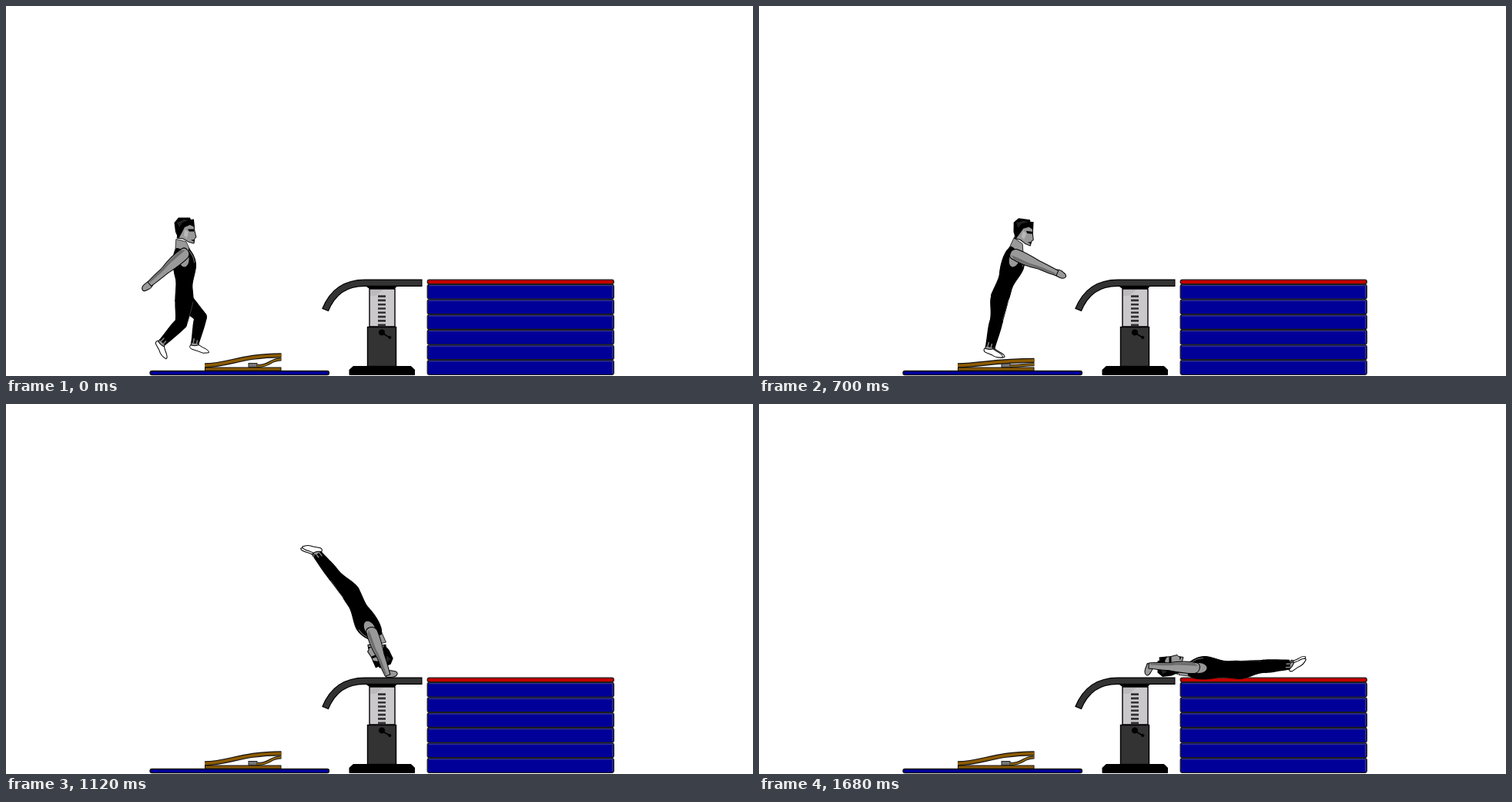
Recreate the animation shown at these times as an HTML page. Size 970 px wide and 480 px high, loop 2.1 s.

```html
<!DOCTYPE html>
<html lang="en">
<head>
<meta charset="utf-8">
<title>Vault to handstand</title>
<style>
html, body { margin: 0; width: 100%; height: 100%; overflow: hidden; background: #fff; }
svg { display: block; width: 100vw; height: 100vh; }
.line { fill: none; }
.skin { fill: #999; stroke: #000; stroke-linejoin: round; }
.foot { fill: #fff; stroke: #000; stroke-linejoin: round; }
</style>
</head>
<body>
<svg viewBox="0 0 970 480">
  <defs>
    <g id="thigh"><path d="M-12,-2C-13,9 -8,17 -8,30A8 8 0 0 0 8,30C9,20 11,8 11,-2A11.5 10 0 0 0 -12,-2Z"/></g>
    <g id="shin">
      <path d="M-8,0C-9,10 -6.5,20 -5.5,35H5C6,24 8,12 8,0A8 8 0 0 0 -8,0Z"/>
      <path d="M-2.5,29V35M2,30V35" stroke="#888" stroke-width="1.5"/>
    </g>
    <g id="foot">
      <path class="skin" d="M-5,-2H4L6,3H-5Z"/>
      <path class="foot" d="M-6,1Q0,3 5,1L10,4Q19,8 18,11Q10,13 4,9L-5,6Q-8,4 -6,1Z"/>
    </g>
  </defs>

  <rect x="187" y="473.5" width="232.5" height="5.2" rx="2.6" fill="#000099" stroke="#111" stroke-width="1.3"/>

  <g>
    <rect x="258.5" y="469" width="98.5" height="4" fill="#8c5a00" stroke="#111"/>
    <rect x="315" y="463.5" width="11" height="5" fill="#777" stroke="#222"/>
    <path class="line strut" stroke="#111" stroke-width="4"/>
    <path class="line strut" stroke="#94690a" stroke-width="2"/>
    <path class="line plank" stroke="#111" stroke-width="6.2"/>
    <path class="line plank" stroke="#8c5a00" stroke-width="3.8"/>
  </g>

  <g stroke="#000">
    <path d="M467,363H508L504,367H473Z"/>
    <rect x="472" y="367" width="33" height="49" fill="#cac8ca" stroke-width="1.4"/>
    <path d="M480,376L490,368H473V376Z" fill="#bcbabc" stroke="none"/>
    <path d="M488,375.3V415" stroke="#333" stroke-width="10" stroke-dasharray="2.6 2.7"/>
    <rect x="469.5" y="416.5" width="37" height="51" fill="#333" stroke-width="1.4"/>
    <circle cx="488" cy="423.5" r="3.6"/>
    <path d="M488,424L498,430" stroke-width="1.6"/>
    <circle cx="498.3" cy="430" r="1.6"/>
    <path d="M451,467.5H526L530.5,472V478.5H446V472Z"/>
    <path class="line" d="M414.5,394.5C424,371 440,359.2 466,359.2H540.5" stroke-width="9.4"/>
    <path class="line" d="M415,393.5C424,371 440,359.2 466,359.2H539.5" stroke="#333" stroke-width="7"/>
  </g>

  <g id="mats" stroke-width="1.3"></g>

  <g>
    <use href="#foot" id="farFoot"/>
    <use href="#shin" id="farShin"/>
    <use href="#thigh" id="farThigh"/>
    <g id="neck"><path class="skin" stroke-width=".7" d="M-7,-80L6,-76L10,-66L4,-57L-9,-64Z"/></g>
    <g id="head">
      <path class="skin" d="M-7,-4L-3,-18L8,-24L15,-21L16,-13L18,-5L16,-3.5L15,3L8,1L1,-3Z"/>
      <path d="M3,-15L8,-12L6,-4L2,-7Z" fill="#b8b8b8"/>
      <path d="M-10.5,-24L-5,-30.5L10,-30.5L11,-28L15,-28.5L16,-18L10,-21L3,-18L0,-12L-5,-3L-9,-12Z"/>
      <path d="M-7,-24L2,-28L8,-27L0,-24L-4,-18Z" fill="#222"/>
      <path d="M7,-15.5H15L15.5,-12.5H9ZM11,-1.5L15.5,-2L15,0.5Z"/>
    </g>
    <g id="torso">
      <path d="M-7,-68C-13,-62 -14,-46 -10,-28C-9,-20 -12,-10 -12,0Q-10,11 0,11Q11,11 11,0C12,-8 10,-14 11,-20C12,-28 17,-38 17,-46C17,-55 13,-61 9,-67C10,-62 7,-59 3,-62Q0,-67 -7,-68Z" stroke="#000"/>
      <path class="line" d="M9,-64Q15,-57 15,-48" stroke="#777"/>
    </g>
    <use href="#foot" id="nearFoot"/>
    <use href="#shin" id="nearShin"/>
    <g id="nearThigh">
      <use href="#thigh"/>
      <path class="line" d="M11,0C11,10 9,20 8,28" stroke="#3a3a3a"/>
    </g>
    <g id="armhole"><ellipse class="skin" cx="2" cy="-54" rx="7" ry="11"/></g>
    <g id="hand"><path class="skin" d="M-3.5,-2H3.5Q6,3 4,8Q3,13 0,13Q-4,12 -4,6Z"/></g>
    <g id="arm">
      <path class="skin" d="M-7,-3C-6,-9 5,-9 7,-1C8,12 6,24 5,32C5,42 4,50 3.5,59H-3.5C-5,48 -5,42 -5,34C-7,24 -9,10 -7,-3Z"/>
      <path fill="#6c6c6c" d="M-6.5,0C-7,12 -5,24 -4.5,34L-3,57H-1C-1,44 -1,36 -2,28C-4,18 -2,8 -3,-5Z"/>
    </g>
  </g>
</svg>
<script>
const $ = id => document.getElementById(id);
const THIGH = 30, SHIN = 36, ARM = 58;
const HOLD = 420, STEP = 70, LOOP = 2100, LAST = 19;
const TAKEOFF = 8, UPRIGHT = 15;
const SHOULDER = [2, -60], NECK = [1, -77];

// Landing mats: a thin red cover on six blue blocks
const block = (y, h, fill) =>
  `<rect x="547.2" y="${y}" width="242" height="${h}" rx="2.5" fill="${fill}" stroke="#1c1c1c"/>`;
let mats = block(355.2, 5.4, '#c40000');
for (let i = 0; i < 6; i++) {
  const y = 361.3 + i * 19.65;
  mats += block(y, 18.8, '#000099') +
    `<path class="line" d="M549,${y + 1.4}H787.5V${y + 17}" stroke="#34348c"/>`;
}
$('mats').innerHTML = mats;

const mix = (a, b, u) => a + (b - a) * u;

// Turns the local point (x, y) around p.
function turn(p, deg, [x, y]) {
  const r = deg * Math.PI / 180, c = Math.cos(r), s = Math.sin(r);
  return [p[0] + x * c - y * s, p[1] + x * s + y * c];
}

// Legs side by side: thigh, shin and foot of the near leg, then of the far one.
const together = (leg, foot = leg + 30) =>
  [leg - 4, leg, foot, leg - 6, leg - 2, foot - 2];

// Run-up: [step, hip x, hip y, lean, head, arm, legs...], angles in degrees.
const run = [
  [0, 232, 382, -3, 0, 49, 9, 44, 43, -44, 12, 0],
  [1, 243, 374, 0, 0, 44, 6, 24, 10, -40, 3, 0],
  [3, 279, 372, 2, 0, -9, -3, 1, 3, -8, -6, 0],
  [5, 313, 379, 18, 8, -66, ...together(14, 4)],
  [7, 343, 350, 44, 31, -101, ...together(29)],
  [8, 372, 345, 68, 42, -80, ...together(62)]
];

function runUp(k) {
  const i = Math.max(1, run.findIndex(p => p[0] >= k));
  const a = run[i - 1], b = run[i], u = (k - a[0]) / (b[0] - a[0]);
  const [, x, y, lean, head, arm, ...legs] = a.map((n, j) => mix(n, b[j], u));
  return { hip: [x, y], lean, head, arm, hand: 0, legs };
}

// The hands stay planted while the body slows into the vertical.
function swing(k) {
  const left = (UPRIGHT - k) / (UPRIGHT - TAKEOFF - 1);
  const lean = 180 - 85 * left ** 2.5;
  const arm = 4 - 54 * left ** 2;
  const shoulder = turn([498 - 4 * left, 351], arm, [0, -ARM]);
  const hip = turn(shoulder, lean, SHOULDER.map(n => -n));
  return { hip, lean, head: 180 - 95 * left ** 4, arm, hand: -76, legs: together(181 - 88 * left ** 2) };
}

// The straight body falls onto its back.
function fall(k) {
  const u = (k - UPRIGHT) / (LAST - UPRIGHT);
  const lean = 180 + 90 * u ** 1.3;
  const leg = lean - 3 * u;
  return {
    hip: [mix(504, 625, u), mix(233, 344.5, u ** 2.5)],
    lean, head: lean, arm: lean - 177, hand: -76, legs: together(leg, leg + 30 + 10 * u)
  };
}

function place(id, p, deg) {
  $(id).setAttribute('transform', `translate(${p[0].toFixed(2)} ${p[1].toFixed(2)}) rotate(${deg.toFixed(2)})`);
}

function placeLeg(side, hip, [thigh, shin, foot]) {
  const knee = turn(hip, thigh, [0, THIGH]);
  place(side + 'Thigh', hip, thigh);
  place(side + 'Shin', knee, shin);
  place(side + 'Foot', turn(knee, shin, [0, SHIN]), foot);
}

function bendBoard(c) {
  const set = (name, d) => document.querySelectorAll(name).forEach(e => e.setAttribute('d', d));
  set('.plank', `M258,466.3C290,466 305,${453.3 + c} 357.5,${453.3 + c}`);
  set('.strut', `M326,467C345,467 341,${458.5 + c} 357.5,${458.5 + c}`);
}

function draw(t) {
  const k = t < HOLD ? 0 : Math.min(LAST, 1 + Math.floor((t - HOLD) / STEP));
  const move = k <= TAKEOFF ? runUp : k <= UPRIGHT ? swing : fall;
  const { hip, lean, head, arm, hand, legs } = move(k);
  const shoulder = turn(hip, lean, SHOULDER);
  for (const id of ['torso', 'neck', 'armhole']) place(id, hip, lean);
  place('head', turn(hip, lean, NECK), head);
  place('arm', shoulder, arm);
  place('hand', turn(shoulder, arm, [0, ARM]), arm + hand);
  placeLeg('near', hip, legs.slice(0, 3));
  placeLeg('far', hip, legs.slice(3));
  bendBoard(Math.max(0, 10 - 6.7 * Math.abs(k - 4.5)));
}

const start = performance.now();
function tick() {
  draw((performance.now() - start) % LOOP);
  requestAnimationFrame(tick);
}
tick();
</script>
</body>
</html>
```
